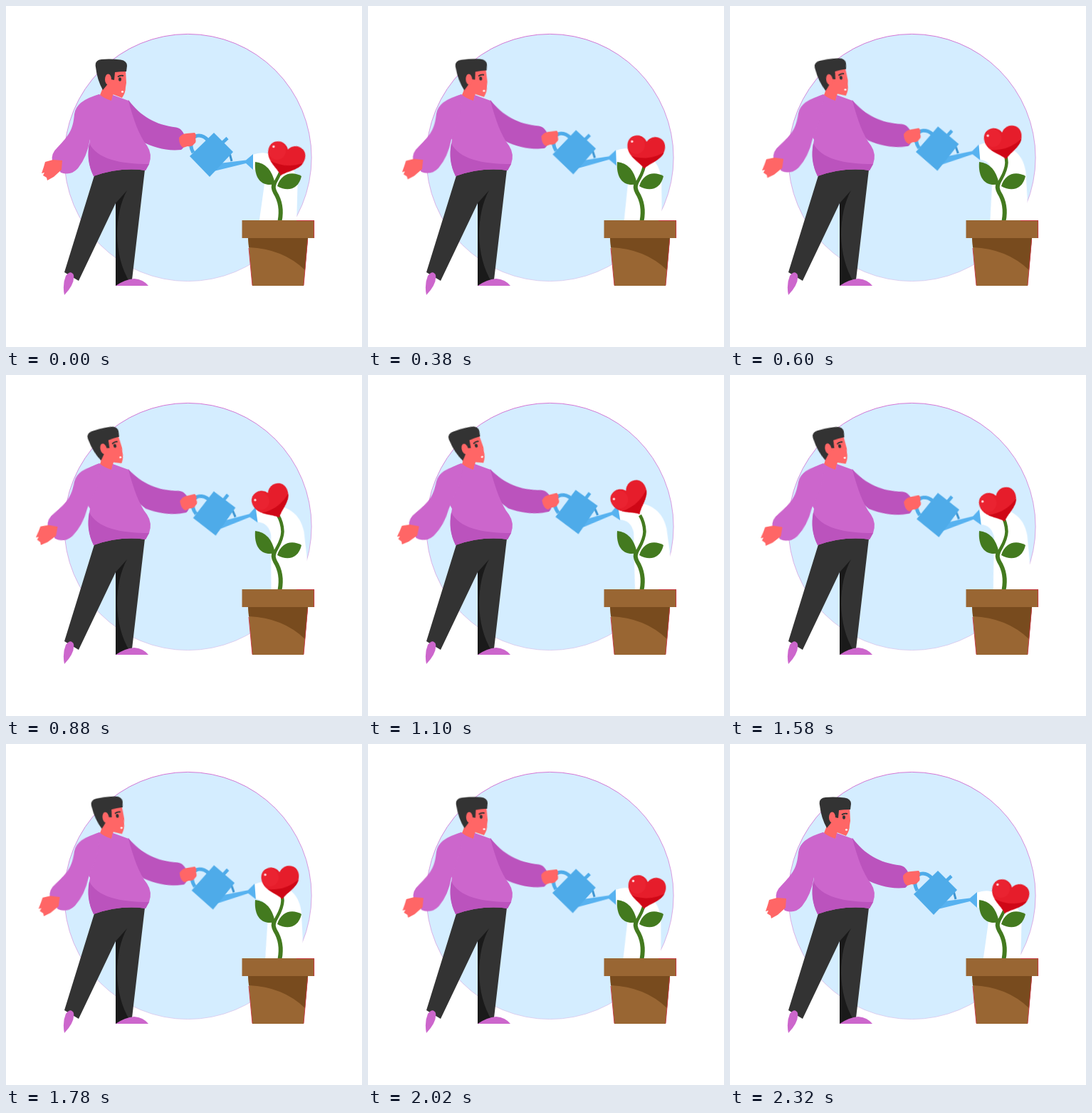
Recreate the animation shown at these times as an HTML page without scripts. Size 500 by 479 pixels, loop 2.34 s.

```html
<!DOCTYPE html>
<html lang="en">
<head>
<meta charset="utf-8">
<title>Watering the heart</title>
<style>
  html, body { margin: 0; height: 100%; overflow: hidden; background: #fff; }
  svg { display: block; width: 100%; height: 100%; }

  /* Every moving part swings around its joint and back. */
  .swing { transform-box: view-box; animation: swing 1170ms ease-in-out infinite alternate; }
  .head { transform-origin: 143px 129px; --turn: -16.5deg; }
  .sleeve { transform-origin: 173px 135px; --turn: -7.5deg; }
  .can { transform-origin: 188px 172px; --turn: -9.2deg; }
  .back-arm { transform-origin: 115px 150px; --turn: 6.5deg; }
  .heart { transform-origin: 333px 222px; --turn: -46deg; }
  @keyframes swing { to { transform: rotate(var(--turn)); } }

  .sweater { fill: #cc66cc; }
  .sweater-shade { fill: #bb53bd; }
  .skin { fill: #ff6666; }
  .dark { fill: #333; }
  .metal { fill: #4eabe9; }
  .leaf { fill: #437a1f; }
  .clay { fill: #996633; }
  .line { fill: none; }
</style>
</head>
<body>
<svg viewBox="0 0 500 479" xmlns="http://www.w3.org/2000/svg">
  <linearGradient id="rim" x2="0" y2="1">
    <stop stop-color="#cc55c8"/>
    <stop offset="1" stop-color="#d8c8ec"/>
  </linearGradient>
  <circle cx="255.5" cy="213" r="173.6" fill="#d4edff" stroke="url(#rim)" stroke-width=".8"/>

  <path class="swing sleeve sweater-shade" d="M172 132 C189 155 210 167 239 170.5 C253 173 256 196 246 202 C225 204 208 199 190 190 L160 160 Z"/>

  <g class="swing can">
    <path class="water" fill="#fff" d="M346 209 Q358 205 366 207 C390 212 408 224 409.5 252 L407 346 H350 L356 300 L363 250 Q362 232 346 229 Z"/>
    <path class="line" stroke="#4eabe9" stroke-width="5" d="M263 206 C256 194 262 182 271 182 Q278 182 284 189"/>
    <path class="line" stroke="#3d95d2" stroke-width="3" d="M313 203 L317 218"/>
    <path fill="#57b2f0" d="M292 232 L300 221 L337 216.5 L347 208 V230 L337 221 Z"/>
    <path class="metal" d="M292 178 L319 205 L286 240 L258 211 Z"/>
    <path class="line" stroke="#4eabe9" stroke-width="4.5" d="M303 193 L311 185.5"/>
    <path class="skin" d="M243 185 Q247 179 254 179 L265 178 Q268 181 266 186 Q268 191 264 194 Q261 198 255 197 L249 199 Q243 196 243 185 Z"/>
  </g>

  <g class="legs">
    <path class="dark" d="M125 235 L82 374 L102 386 L154 277 V393 H176 L195 230 Q160 220 125 235 Z"/>
    <path fill="#1a1a1a" d="M154 277 L170 259 C152 291 150 350 174 388 L176 393 H154 Z"/>
    <path class="sweater" d="M82 406 Q79 391 84 379 Q91 370 95 378 Q97 390 82 406 Z"/>
    <path class="sweater" d="M154 393 Q167 384 180 383 Q193 384 200 393 Z"/>
  </g>

  <path class="skin" d="M138 110 L130 130 L148 136 L151 122 Z"/>

  <g class="swing head">
    <path class="skin" d="M138 106 L134 127 L148 133 L150 124 L163 129 Q168 122 168 114 L169 108 L168 89 H146 Z"/>
    <path class="dark" d="M126 86 Q124 76 134 75 Q147 74 161 75.5 Q170 77 170 84 L169 92 Q160 92 153 93 L152 104 L147 103 L141 112 L136 118 Q128 104 126 86 Z"/>
    <ellipse class="skin" cx="143.5" cy="103" rx="4.5" ry="7.5"/>
    <ellipse class="dark" cx="160" cy="103" rx="2" ry="2.8"/>
    <path class="line" stroke="#333" stroke-width="1.8" d="M157 99.5 Q160 97 165 98"/>
    <ellipse fill="#fff" cx="163.5" cy="120.5" rx="1.6" ry="1.2"/>
  </g>

  <g class="torso">
    <path class="sweater" d="M131 124 Q138 130 148 133 L150 125 L172 133 C179 160 187 182 198 196 Q206 208 201 222 L196 231 Q160 226 123 239 Q112 217 118 188 L98 150 Q105 133 131 124 Z"/>
    <path class="sweater-shade" d="M117 193 C128 215 160 222 201 222 L196 231 Q160 226 123 239 Q112 217 117 193 Z"/>
  </g>

  <g class="swing back-arm">
    <path class="sweater" d="M131 124 Q98 133 96 152 C94 174 89 181 72 199 Q63 207 65 218 L77 234 Q91 239 101 228 Q114 212 118 187 L130 150 Z"/>
    <path class="skin" d="M55 219 L66 216 L79 217 L78 230 L67 240 L58 245 L57 241 L52 238 L54 234 L50 235 L53 226 Z"/>
  </g>

  <g class="plant">
    <path class="line" stroke="#437a1f" stroke-width="6" d="M384.5 302 C388 284 383 270 378 262 Q374 254 377 249"/>
    <path class="line" stroke="#437a1f" stroke-width="4.5" d="M376 254 C377 246 388 236 388.5 220 Q388 207 382 197"/>
    <path class="leaf" d="M378 250 C360 255 348 243 350 219 Q372 221 378 250 Z"/>
    <path class="leaf" d="M381 253 C386 236 401 231 415 239 C411 257 396 262 381 253 Z"/>
  </g>

  <g class="swing heart">
    <g transform="translate(392 216) rotate(15.5)">
      <path fill="#e61d2b" d="M0 23 C-7 14 -26.5 8 -26.5 -9 C-26.5 -24 -7 -28 0 -15 C7 -28 26.5 -24 26.5 -9 C26.5 8 7 14 0 23 Z"/>
      <ellipse fill="#ea2331" cx="-14" cy="-9" rx="12" ry="12.5"/>
      <path fill="#cf0716" d="M-19 7 Q4 12 25.5 -2 C22 9 6 15 0 23 C-4 17 -13 13 -19 7 Z"/>
      <circle fill="#ffd5d8" cx="-20.5" cy="-13.5" r="1.7"/>
    </g>
  </g>

  <g class="pot">
    <path class="clay" d="M340 326 H424 L418 393 H346 Z"/>
    <path fill="#784b1e" d="M340 326 H424 L420 371 Q389 341 341 339 Z"/>
    <path class="clay" d="M331.5 301 H433 V326 H331.5 Z"/>
    <path class="line" stroke="#c8333f" stroke-width=".9" d="M408 301.5 H432.6 V326 M423.6 328 L418 392.5 M341 340 L346 392.5"/>
  </g>
</svg>
</body>
</html>
```
